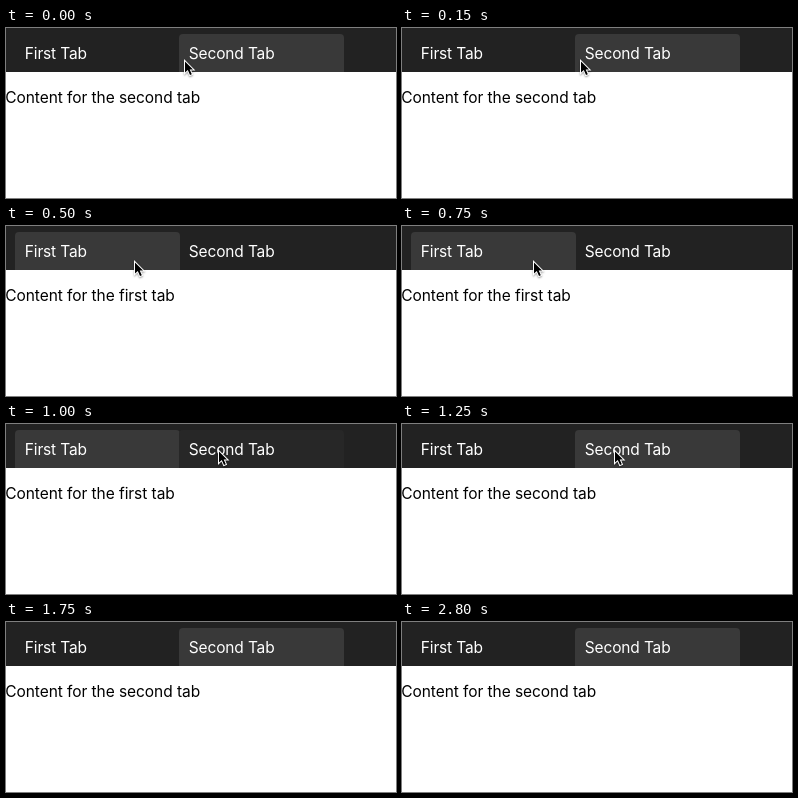
These frames come from a looping animation (390x170 px, 3.5 s). An HTML page with a canvas:

```html
<!DOCTYPE html>
<html lang="en">
<head>
<meta charset="utf-8">
<title>Tabs</title>
<style>
  html, body { margin: 0; width: 100%; height: 100%; overflow: hidden; background: #fff; }
  canvas { display: block; width: 390px; height: 170px; }
</style>
</head>
<body>
<canvas id="stage"></canvas>
<script>
const W = 390, H = 170, LOOP = 3500;
const BAR = '#222', HOVER = '#272727', ACTIVE = '#393939';
const TABS = [
  { x: 9, label: 'First Tab', content: 'Content for the first tab' },
  { x: 173, label: 'Second Tab', content: 'Content for the second tab' }
];
const STEPS = [
  { at: 0, active: 1, hover: 1, cursor: [178, 31] },
  { at: 250, active: 1, hover: 0, cursor: [129, 34] },
  { at: 500, active: 0, hover: 0, cursor: [128, 34] },
  { at: 750, active: 0, hover: 0, cursor: [131, 34] },
  { at: 1000, active: 0, hover: 1, cursor: [212, 25] },
  { at: 1250, active: 1, hover: 1, cursor: [212, 25] },
  { at: 1750, active: 1, hover: -1, cursor: null }
];
const ARROW = [[1, 2.4], [1, 13.6], [3.8, 10.9], [6, 16], [7.8, 15.2], [5.7, 10.4], [9, 10.4]];

const canvas = document.getElementById('stage');
const ctx = canvas.getContext('2d');
const scale = window.devicePixelRatio || 1;
canvas.width = W * scale;
canvas.height = H * scale;

function text(str, x, y, color, spacing) {
  ctx.font = '15.5px Inter, sans-serif';
  ctx.letterSpacing = spacing + 'px';
  ctx.fillStyle = color;
  ctx.fillText(str, x, y);
}

function drawTab(x, color) {
  ctx.fillStyle = color;
  ctx.beginPath();
  ctx.roundRect(x, 6, 165, 38, [4, 4, 0, 0]);
  ctx.fill();
}

function drawCursor([x, y]) {
  ctx.save();
  ctx.translate(x, y);
  ctx.beginPath();
  ARROW.forEach(([px, py]) => ctx.lineTo(px, py));
  ctx.closePath();
  ctx.lineWidth = 2;
  ctx.strokeStyle = '#fff';
  ctx.shadowColor = 'rgba(0, 0, 0, 0.4)';
  ctx.shadowBlur = 2 * scale;
  ctx.shadowOffsetY = scale;
  ctx.stroke();
  ctx.shadowColor = 'transparent';
  ctx.fillStyle = '#000';
  ctx.fill();
  ctx.restore();
}

function draw(time) {
  const step = STEPS.findLast(s => s.at <= time);
  ctx.setTransform(scale, 0, 0, scale, 0, 0);
  ctx.fillStyle = '#fff';
  ctx.fillRect(0, 0, W, H);
  ctx.fillStyle = BAR;
  ctx.fillRect(0, 0, W, 44);

  TABS.forEach((tab, i) => {
    if (i === step.active) drawTab(tab.x, ACTIVE);
    else if (i === step.hover) drawTab(tab.x, HOVER);
  });
  TABS.forEach(tab => text(tab.label, tab.x + 9.8, 31, '#fff', -0.15));
  text(TABS[step.active].content, -0.8, 75, '#000', -0.06);
  if (step.cursor) drawCursor(step.cursor);
}

const start = performance.now();
function tick() {
  draw((performance.now() - start) % LOOP);
  requestAnimationFrame(tick);
}
tick();
</script>
</body>
</html>
```
